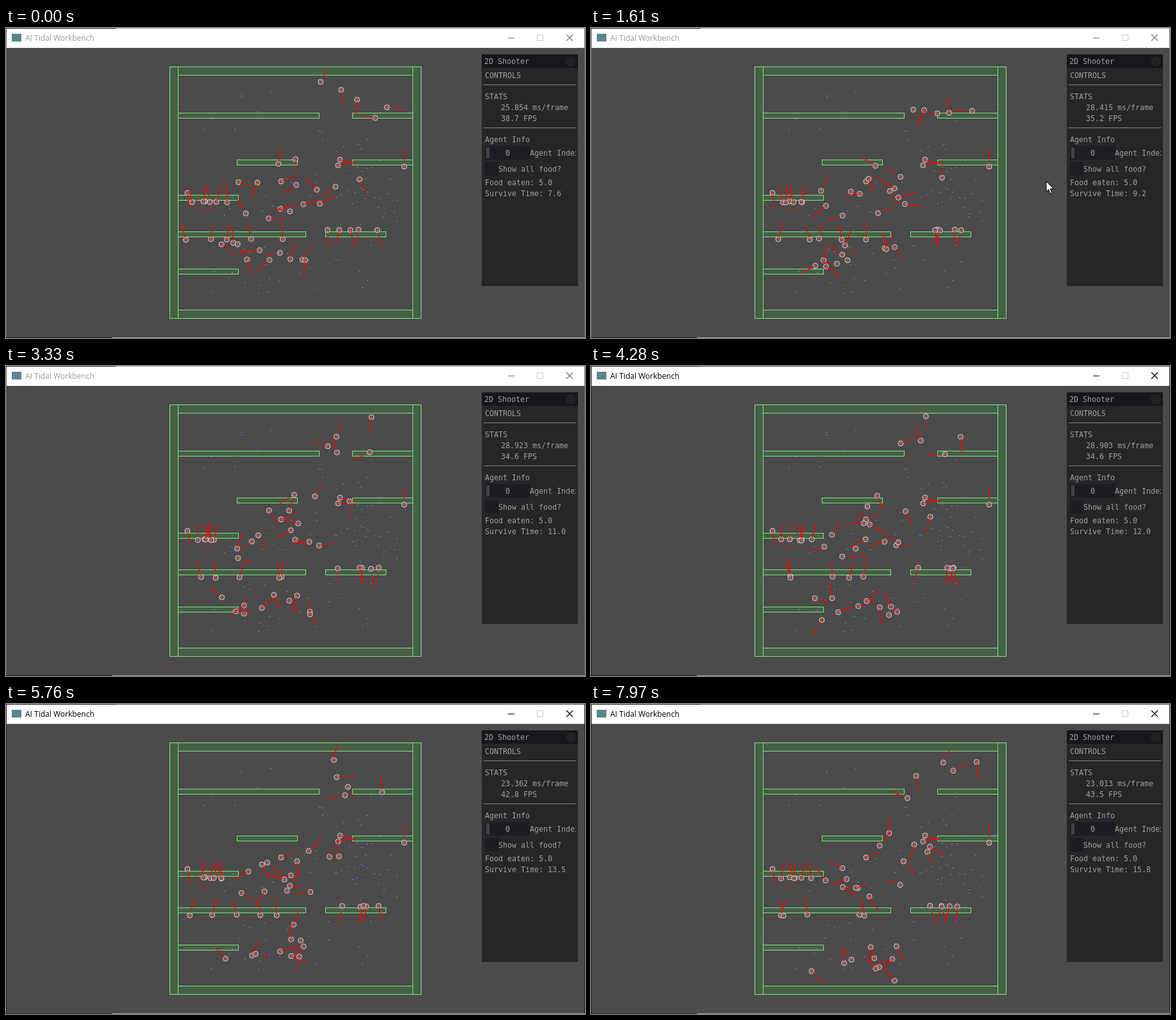
An HTML page with a canvas for the animation above (8 s loop, 903 by 483 pixels).

```html
<!DOCTYPE html>
<html lang="en">
<head>
<meta charset="utf-8">
<title>2D Shooter</title>
<style>
  html, body { margin: 0; width: 100%; height: 100%; overflow: hidden; background: #4b4b4b; }
  canvas { display: block; }
</style>
</head>
<body>
<canvas id="stage" width="903" height="483"></canvas>
<script>
const ctx = document.getElementById('stage').getContext('2d');
const LOOP = 8000;
const ACTIVATED = 3760;
const MONO = '11.63px "DejaVu Sans Mono", "Liberation Mono", monospace';
const SANS = '12px "Open Sans", "Noto Sans", sans-serif';
const UP = -Math.PI / 2;
const DOWN = Math.PI / 2;

const ARENA = { x: 255, y: 60, size: 392, wall: 13 };
const LEDGE_HEIGHT = 8;
const ledges = [
  { x: 268, y: 132, w: 220 }, { x: 540, y: 132, w: 94 },
  { x: 360, y: 205, w: 94 }, { x: 540, y: 205, w: 94 },
  { x: 268, y: 260, w: 94 },
  { x: 268, y: 317, w: 199 }, { x: 498, y: 317, w: 94 },
  { x: 268, y: 375, w: 94 }
];

const foodPatches = [
  { count: 8, x: 304, y: 98, w: 120, h: 70 },
  { count: 10, x: 485, y: 142, w: 115, h: 65 },
  { count: 22, x: 470, y: 215, w: 130, h: 50 },
  { count: 8, x: 307, y: 233, w: 140, h: 65 },
  { count: 12, x: 540, y: 262, w: 70, h: 62 },
  { count: 28, x: 296, y: 338, w: 285, h: 75 }
];

// Agents bounce about inside their zone; drop is how far the zone sinks over a loop.
const zones = [
  { count: 5, x: 482, y: 78, w: 125, h: 70 },
  { count: 5, x: 405, y: 200, w: 150, h: 55 },
  { count: 5, x: 290, y: 270, w: 55, h: 2, facing: UP },
  { count: 9, x: 350, y: 240, w: 145, h: 60 },
  { count: 5, x: 500, y: 314, w: 82, h: 2, facing: DOWN },
  { count: 5, x: 275, y: 328, w: 160, h: 2, facing: UP },
  { count: 10, x: 330, y: 328, w: 150, h: 34, drop: 75 }
];
const parked = [
  { x: 518, y: 214, facing: -.2 }, { x: 521, y: 205, facing: .3 },
  { x: 429, y: 239, facing: -.35 }, { x: 621, y: 216, facing: UP },
  { x: 283, y: 257, facing: 1.4 }, { x: 310, y: 270, facing: UP }
];

const statTimes = [0, 850, 2390, 4280, 5760, 7110, 7970];
const frameMs = [25.852, 27.905, 28.938, 28.907, 23.363, 22.681, 23.013];

const cursorTimes = [620, 820, 1700, 1860, 1940];
const cursorX = [722, 710, 710, 111, 60];
const cursorY = [483, 239, 239, 71, -20];

function seededRandom(seed) {
  return () => {
    seed = (seed * 16807) % 2147483647;
    return seed / 2147483647;
  };
}

const random = seededRandom(4241);

const food = foodPatches.flatMap(patch => Array.from({ length: patch.count }, () => ({
  x: Math.round(patch.x + random() * patch.w),
  y: Math.round(patch.y + random() * patch.h)
})));

const agents = zones.flatMap(zone => Array.from({ length: zone.count }, (_, i) => {
  const angle = random() * 2 * Math.PI;
  const speed = 15 + 20 * random();
  return {
    ...zone,
    startX: (i + random()) / zone.count * zone.w,
    startY: random() * zone.h * 2,
    vx: speed * Math.cos(angle),
    vy: speed * Math.sin(angle),
    sink: (zone.drop || 0) * Math.sqrt(random()),
    swing: random() * 6
  };
}));

function track(times, values, t) {
  let i = 0;
  while (i < times.length - 2 && t >= times[i + 1]) i++;
  const u = Math.min(1, (t - times[i]) / (times[i + 1] - times[i]));
  return values[i] + (values[i + 1] - values[i]) * u;
}

function bounce(distance, size) {
  const d = ((distance % (2 * size)) + 2 * size) % (2 * size);
  return d < size ? { at: d, sign: 1 } : { at: 2 * size - d, sign: -1 };
}

function rect(x, y, w, h, fill) {
  ctx.fillStyle = fill;
  ctx.fillRect(x, y, w, h);
}

function line(x1, y1, x2, y2, color, width = 1) {
  ctx.strokeStyle = color;
  ctx.lineWidth = width;
  ctx.beginPath();
  ctx.moveTo(x1, y1);
  ctx.lineTo(x2, y2);
  ctx.stroke();
  ctx.lineWidth = 1;
}

function text(value, x, y, color = '#a0a0a0', font = MONO) {
  ctx.font = font;
  ctx.fillStyle = color;
  ctx.fillText(value, x, y);
}

function disc(x, y, r, fill, stroke) {
  ctx.beginPath();
  ctx.arc(x, y, r, 0, 7);
  ctx.fillStyle = fill;
  ctx.fill();
  if (stroke) {
    ctx.strokeStyle = stroke;
    ctx.stroke();
  }
}

function drawWindow(active) {
  const ink = active ? '#000' : '#777';
  const edge = active ? '#222' : '#666';
  rect(0, 0, 903, 483, '#4b4b4b');
  rect(0, 0, 903, 31, '#fff');
  rect(0, 0, 1, 483, edge);
  rect(902, 0, 1, 483, edge);
  rect(0, 0, 171, 1, '#222');
  rect(171, 0, 732, 1, active ? '#555' : '#aaa');
  rect(0, 482, 165, 1, '#111');
  rect(165, 482, 738, 1, '#ababab');
  rect(9, 9, 15, 12, '#5d8589');
  text('AI Tidal Workbench', 30, 20, active ? '#000' : '#999', SANS);
  line(783, 15.5, 793, 15.5, ink);
  ctx.strokeStyle = '#ccc';
  ctx.strokeRect(828.5, 10.5, 9, 9);
  line(874, 10, 884, 20, ink, 1.3);
  line(884, 10, 874, 20, ink, 1.3);
}

function drawWall(x, y, w, h) {
  rect(x, y, w, h, '#475f47');
  ctx.strokeStyle = '#7fe67f';
  ctx.strokeRect(x + .5, y + .5, w, h);
}

function drawArena() {
  const { x, y, size, wall } = ARENA;
  for (const offset of [0, size - wall]) {
    drawWall(x + offset, y, wall, size);
    drawWall(x + wall, y + offset, size - 2 * wall, wall);
  }
  for (const ledge of ledges) drawWall(ledge.x, ledge.y, ledge.w, LEDGE_HEIGHT);
  for (const dot of food) rect(dot.x, dot.y, 2, 1, '#8080e6');
}

function drawAgent(x, y, heading, id) {
  const dx = Math.cos(heading), dy = Math.sin(heading);
  const reach = 23 + id % 5;
  const gap = id % 4 ? 3 : 9;
  disc(x, y, 4, '#795454', '#ebcfcf');
  line(x, y, x + 4 * dx, y + 4 * dy, '#c98f8f');
  ctx.setLineDash(id % 3 ? [] : [5, 2]);
  line(x + gap * dx, y + gap * dy, x + reach * dx, y + reach * dy, '#f00', 1.4);
  ctx.setLineDash([]);
}

function drawAgents(t) {
  ctx.setLineDash([6, 3]);
  ctx.strokeStyle = '#f00';
  ctx.beginPath();
  ctx.arc(311, 271, 14, 0, 1.2 * Math.PI);
  ctx.stroke();
  ctx.setLineDash([]);

  parked.forEach((agent, id) => drawAgent(agent.x, agent.y, agent.facing, id + 1));
  agents.forEach((agent, id) => {
    const seconds = t / 1000;
    const across = bounce(agent.startX + agent.vx * seconds, agent.w);
    const down = bounce(agent.startY + agent.vy * seconds, agent.h);
    const travel = Math.atan2(agent.vy * down.sign, agent.vx * across.sign);
    const heading = (agent.facing ?? travel) + .3 * Math.sin(seconds * 1.7 + agent.swing);
    drawAgent(agent.x + across.at, agent.y + down.at + agent.sink * t / LOOP, heading, id);
  });
}

function drawPanel(t) {
  const ms = track(statTimes, frameMs, t);
  const survived = 7.575 + 1.035 * t / 1000;
  rect(742, 41, 150, 361, '#262628');
  rect(742, 41, 150, 21, '#17171b');
  disc(881, 52, 8, '#222225');
  text('2D Shooter', 746, 56);
  text('CONTROLS', 747, 78);
  rect(745, 88, 144, 1, '#858585');
  text('STATS', 747, 111);
  text(ms.toFixed(3) + ' ms/frame', 772, 128);
  text((1000 / ms).toFixed(1) + ' FPS', 772, 145);
  rect(745, 155, 144, 1, '#858585');
  text('Agent Info', 747, 178);
  rect(747, 184, 70, 21, '#1d1d21');
  rect(749, 186, 5, 17, '#414146');
  text('0', 779, 199);
  ctx.save();
  ctx.beginPath();
  ctx.rect(742, 184, 147, 21);
  ctx.clip();
  text('Agent Index', 817, 199);
  ctx.restore();
  rect(747, 209, 21, 21, '#1d1d21');
  text('Show all food?', 768, 224);
  text('Food eaten: 5.0', 747, 245);
  text('Survive Time: ' + survived.toFixed(1), 747, 262);
}

function drawCursor(t) {
  if (t < cursorTimes[0] || t > cursorTimes[4]) return;
  ctx.save();
  ctx.translate(track(cursorTimes, cursorX, t), track(cursorTimes, cursorY, t));
  const arrow = new Path2D('M0 0V16L3.7 12.5 6.5 19 9 18 6.2 11.6H11.5Z');
  ctx.fillStyle = '#fff';
  ctx.fill(arrow);
  ctx.strokeStyle = '#000';
  ctx.stroke(arrow);
  ctx.restore();
}

function draw(t) {
  drawWindow(t >= ACTIVATED);
  drawArena();
  drawAgents(t);
  drawPanel(t);
  drawCursor(t);
}

const start = performance.now();
function tick() {
  draw((performance.now() - start) % LOOP);
  requestAnimationFrame(tick);
}
tick();
</script>
</body>
</html>
```
